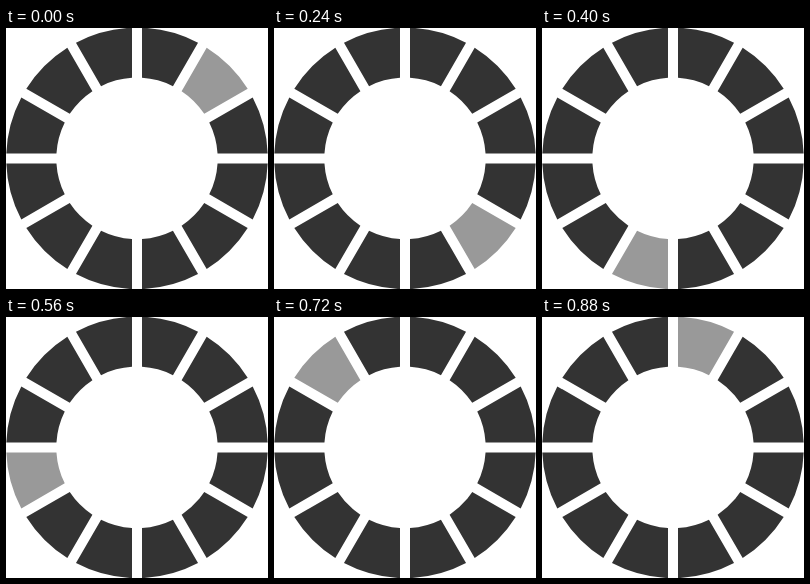
Write an HTML page that moves like this. It is 262 by 261 pixels and loops after 960 ms.

```html
<!DOCTYPE html>
<html lang="en">
<head>
<meta charset="utf-8">
<title>Loading ring</title>
<style>
  html, body { margin: 0; width: 100%; height: 100%; overflow: hidden; background: #fff; }
  svg { display: block; width: 100vw; height: 100vh; }
</style>
</head>
<body>
<svg id="ring" viewBox="0 0 262 261"></svg>
<script>
const COUNT = 12, STEP = 80;
const CX = 131, CY = 130.4, OUTER = 130.8, INNER = 80.7, HALF_GAP = 5;
const DARK = '#333', LIGHT = '#999';
const ring = document.getElementById('ring');

// Clockwise angle from twelve o'clock, shifted so that the gaps have parallel sides.
function point(r, turn, side) {
  const a = turn * 2 * Math.PI / COUNT + side * Math.asin(HALF_GAP / r);
  return `${(CX + r * Math.sin(a)).toFixed(3)} ${(CY - r * Math.cos(a)).toFixed(3)}`;
}

function segment(i) {
  const path = document.createElementNS('http://www.w3.org/2000/svg', 'path');
  path.setAttribute('d',
    `M${point(INNER, i, 1)} L${point(OUTER, i, 1)}` +
    `A${OUTER} ${OUTER} 0 0 1 ${point(OUTER, i + 1, -1)}` +
    `L${point(INNER, i + 1, -1)}` +
    `A${INNER} ${INNER} 0 0 0 ${point(INNER, i, 1)}Z`);
  ring.appendChild(path);
  return path;
}

const segments = Array.from({ length: COUNT }, (_, i) => segment(i));

function draw(ms) {
  const active = (Math.floor(ms / STEP) + 1) % COUNT;
  segments.forEach((s, i) => s.setAttribute('fill', i === active ? LIGHT : DARK));
}

let start;
function tick(now) {
  start ??= now;
  draw(Math.max(0, now - start));
  requestAnimationFrame(tick);
}
draw(0);
requestAnimationFrame(tick);
</script>
</body>
</html>
```
